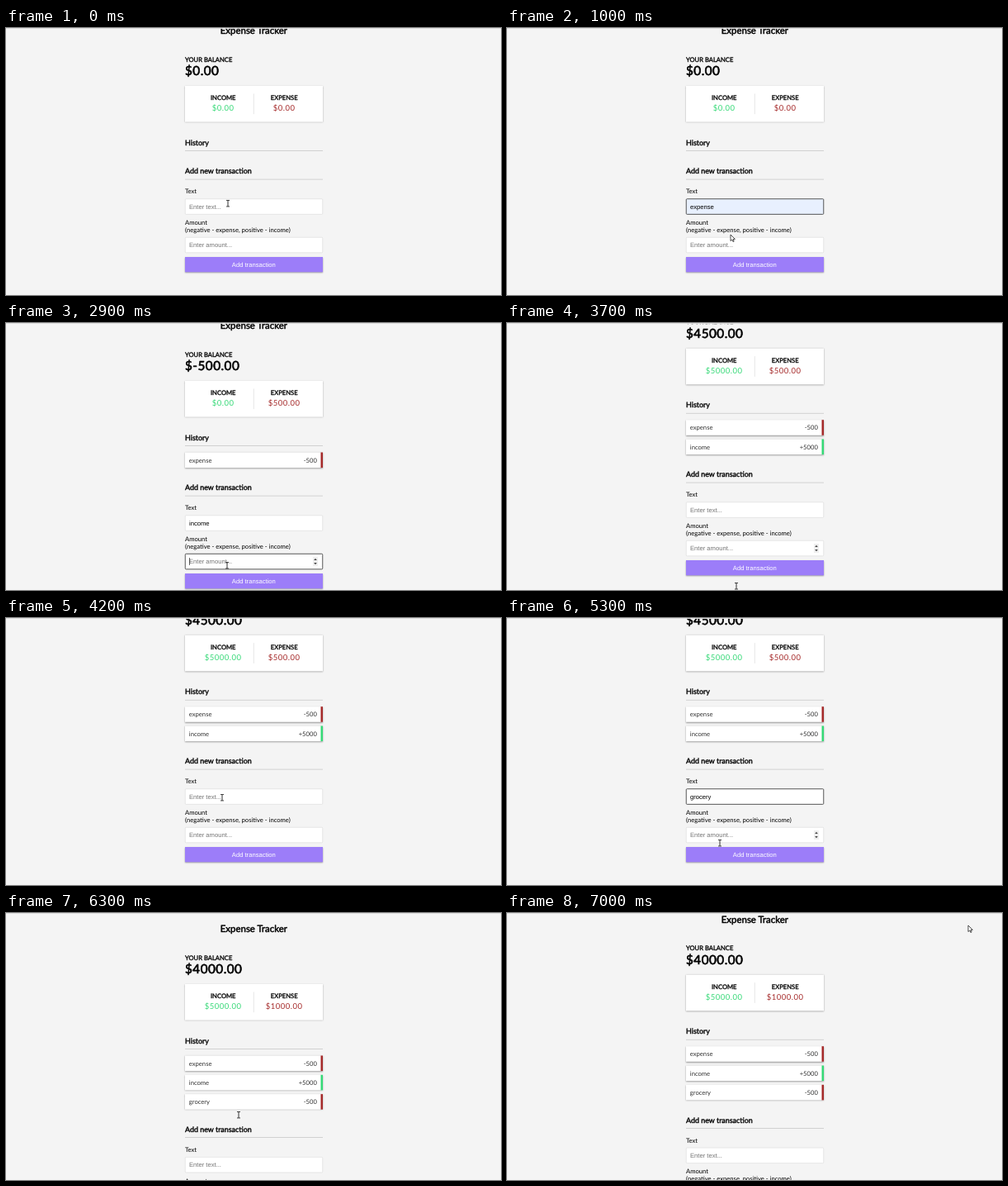
An HTML page with a canvas that plays this animation: 600 by 323 pixels, repeating every 7.1 s.

```html
<!DOCTYPE html>
<html lang="en">
<head>
<meta charset="utf-8">
<title>Expense Tracker</title>
<style>
html, body { margin: 0; width: 100%; height: 100%; overflow: hidden; background: #f4f4f4; }
canvas { display: block; }
</style>
</head>
<body>
<canvas id="stage" width="600" height="323"></canvas>
<script>
const ctx = document.getElementById('stage').getContext('2d');
const LOOP = 7100, STEP = 100;
const LEFT = 217, RIGHT = 384, WIDTH = RIGHT - LEFT, BASE = 7.63;
const LATO = 'Lato, sans-serif', ARIAL = '"Liberation Sans", Arial, sans-serif';
const GREEN = '#36d977', RED = '#a52a2a', PURPLE = '#9c7df9';

// Times: field focus, first key, submit; autofill completes the name at once.
const entries = [
  { name: 'expense', amount: -500, nameFocus: 500, nameKey: 600, fill: 900, amountFocus: 1200, amountKey: 1300, submit: 1900 },
  { name: 'income', amount: 5000, nameFocus: 2200, nameKey: 2200, amountFocus: 2800, amountKey: 3000, submit: 3600 },
  { name: 'grocery', amount: -500, nameFocus: 4300, nameKey: 4400, amountFocus: 5400, amountKey: 5500, submit: 6000 }
];
const scrollKeys = [[0, 0], [3600, 0], [3700, -39.3], [3800, -49.3], [6000, -49.3], [6300, 16], [6400, 16], [6600, 4.7]];
const pointerKeys = [
  [0, 269, 212, 'beam'], [400, 269, 212, 'beam'], [500, 268, 216, 'beam'], [700, 268, 218, 'beam'],
  [900, 272, 240, 'arrow'], [1000, 271, 250, 'arrow'], [1100, 270, 258, 'beam'], [1400, 270, 263, 'beam'],
  [1700, 270, 284, 'hand'], [1800, 270, 286, 'hand'], [1900, 270, 286, 'hand'], [2000, 270, 284, 'beam'],
  [2200, 268, 242, 'beam'], [2600, 268, 250, 'beam'], [2800, 268, 290, 'beam'], [2900, 268, 293, 'beam'],
  [3200, 268, 294, 'beam'], [3400, 272, 312, 'hand'], [3600, 274, 314, 'hand'], [3700, 278, 318, 'beam'],
  [3900, 276, 300, 'beam'], [4200, 262, 217, 'beam'], [5000, 262, 220, 'beam'], [5300, 258, 272, 'beam'],
  [5400, 258, 264, 'beam'], [5600, 260, 266, 'beam'], [5800, 268, 286, 'hand'], [6000, 270, 284, 'hand'],
  [6100, 274, 270, 'beam'], [6300, 282, 244, 'beam'], [6400, 282, 230, 'arrow'], [6700, 286, 217, 'arrow'],
  [6800, 380, 140, 'arrow'], [6900, 520, 40, 'arrow'], [7000, 559, 15, 'arrow']
];

function tween(keys, t) {
  let i = keys.length - 1;
  while (i > 0 && keys[i][0] > t) i--;
  const a = keys[i], b = keys[i + 1] || a;
  const p = b === a ? 0 : (t - a[0]) / (b[0] - a[0]);
  return a.slice(1).map((v, j) => typeof v === 'number' ? v + (b[j + 1] - v) * p : v);
}

function text(str, x, y, { size = BASE, font = LATO, color = '#000', align = 'left', bold = false, spacing = 0 } = {}) {
  ctx.font = `${size}px ${font}`;
  ctx.textRendering = 'geometricPrecision';
  ctx.letterSpacing = spacing + 'px';
  ctx.textAlign = align;
  ctx.fillStyle = ctx.strokeStyle = color;
  ctx.fillText(str, x, y);
  if (bold) {
    ctx.lineWidth = size / 24;
    ctx.lineJoin = 'round';
    ctx.strokeText(str, x, y);
  }
}

function rect(x, y, w, h, color) {
  ctx.fillStyle = color;
  ctx.fillRect(x, y, w, h);
}

function panel(y, h, color = '#fff') {
  ctx.save();
  ctx.shadowColor = 'rgba(0,0,0,.38)';
  ctx.shadowBlur = 1.8;
  ctx.shadowOffsetY = 0.7;
  rect(LEFT, y, WIDTH, h, color);
  ctx.restore();
}

function heading(str, y) {
  text(str, LEFT, y, { size: 8.93, bold: true });
  rect(LEFT, y + 6.5, WIDTH, 0.6, '#bbb');
}

function total(label, value, x, color) {
  text(label, x, 86.9, { align: 'center', bold: true });
  text('$' + value.toFixed(2), x, 100.4, { size: 9.54, color, align: 'center', spacing: 0.48 });
}

function input(y, value, hint, { focused, filled, spinner, caret }) {
  ctx.beginPath();
  ctx.roundRect(LEFT + 0.25, y + 0.25, WIDTH - 0.5, 18.6, 1);
  ctx.fillStyle = filled ? '#e8f0fe' : '#fff';
  ctx.fill();
  ctx.lineWidth = focused ? 0.9 : 0.5;
  ctx.strokeStyle = focused ? '#444' : '#d0d0d0';
  ctx.stroke();
  text(value || hint, 222, y + 12.2, { font: ARIAL, color: value ? '#000' : '#757575' });
  if (focused && caret) rect(222.2 + (value ? ctx.measureText(value).width : 0), y + 5, 0.6, 9, '#000');
  if (spinner) {
    rect(372, y + 4, 6, 11, '#efefef');
    for (const dir of [-1, 1]) {
      const cy = y + 9.5 + dir * 1.5;
      ctx.beginPath();
      ctx.moveTo(373.2, cy);
      ctx.lineTo(376.8, cy);
      ctx.lineTo(375, cy + dir * 2.2);
      ctx.fillStyle = '#444';
      ctx.fill();
    }
  }
}

function listItem(entry, y, hovered) {
  const color = entry.amount < 0 ? RED : GREEN;
  panel(y, 18.6);
  rect(RIGHT - 2.5, y, 2.5, 18.6, color);
  text(entry.name, 221.8, y + 12, { color: '#333' });
  text((entry.amount < 0 ? '' : '+') + entry.amount, 376.8, y + 12, { color: '#333', align: 'right' });
  if (hovered) {
    rect(207, y + 2.6, 10, 13.4, '#e74c3c');
    text('x', 212, y + 12, { size: 9.5, color: '#fff', align: 'center' });
  }
}

function form(top, t) {
  const entry = entries.find(e => t < e.submit);
  const typed = (str, start) => str.slice(0, Math.max(0, (t - start) / STEP + 1));
  let name = '', amount = '', focus = '';
  if (entry) {
    name = t >= entry.fill ? entry.name : typed(entry.name, entry.nameKey);
    amount = typed(String(entry.amount), entry.amountKey);
    focus = t >= entry.amountFocus ? 'amount' : t >= entry.nameFocus ? 'name' : '';
  }
  const caret = t % 1000 >= 500;
  const spinner = [[1200, 2100], [2800, 4200], [5300, 6000]].some(([a, b]) => t >= a && t < b);

  ctx.save();
  ctx.translate(0, top);
  heading('Add new transaction', 176.3);
  text('Text', LEFT, 200.3);
  input(206.5, name, 'Enter text...', { focused: focus === 'name', filled: entry && t >= entry.fill, caret });
  text('Amount', LEFT, 238);
  text('(negative - expense, positive - income)', LEFT, 247);
  input(253, amount, 'Enter amount...', { focused: focus === 'amount', spinner, caret });
  panel(277, 18.3, PURPLE);
  text('Add transaction', 300.3, 288.8, { font: ARIAL, color: '#fff', align: 'center' });
  ctx.restore();
}

function outline(points, x, y) {
  ctx.beginPath();
  points.forEach(([px, py]) => ctx.lineTo(x + px, y + py));
  ctx.closePath();
  ctx.lineJoin = 'round';
  ctx.lineWidth = 0.8;
  ctx.fillStyle = '#fff';
  ctx.strokeStyle = '#222';
  ctx.fill();
  ctx.stroke();
}

const pointers = {
  beam(x, y) {
    rect(x - 0.5, y - 3.5, 1, 7.5, '#333');
    rect(x - 2, y - 4, 4, 0.9, '#333');
    rect(x - 2, y + 3.5, 4, 0.9, '#333');
  },
  arrow(x, y) {
    outline([[0, 0], [0, 7.6], [1.8, 6], [3, 8.6], [4.2, 8], [3.1, 5.5], [5.4, 5.4]], x, y);
  },
  hand(x, y) {
    outline([[-1.2, -4.5], [0.2, -4.5], [0.4, -1], [3.6, 0], [4, 1.5], [3, 5], [-1.5, 5],
      [-4, 1.2], [-3.2, 0.4], [-1.4, 1.8]], x, y);
  }
};

function draw(t) {
  const [scroll] = tween(scrollKeys, t);
  const [x, y, pointer] = tween(pointerKeys, t);
  const history = entries.filter(e => t >= e.submit);
  const sum = sign => history.reduce((s, e) => s + Math.max(0, e.amount * sign), 0);
  const income = sum(1), expense = sum(-1);

  rect(0, 0, 600, 323, '#f4f4f4');
  ctx.save();
  ctx.translate(0, scroll);
  text('Expense Tracker', 300.3, 7.2, { size: 11.45, align: 'center', bold: true });
  text('YOUR BALANCE', LEFT, 40.7, { bold: true });
  text('$' + (income - expense).toFixed(2), LEFT, 57.4, { size: 15.27, bold: true, spacing: 0.48 });
  panel(70, 43.7);
  rect(299.9, 79.5, 0.5, 24.7, '#ccc');
  total('INCOME', income, 263.2, GREEN);
  total('EXPENSE', expense, 337.2, RED);
  heading('History', 141.7);
  history.forEach((entry, i) => {
    const top = 156.5 + i * 23.3, rel = y - scroll - top;
    listItem(entry, top, x > LEFT && x < RIGHT && rel > 0 && rel < 18.6);
  });
  form(history.length ? 2.7 + history.length * 23.3 : 0, t);
  ctx.restore();

  rect(0, 0, 600, 1, '#dcdcdc');
  pointers[pointer](x, y);
}

function frame(now) {
  draw(Math.floor(now % LOOP / STEP) * STEP);
  requestAnimationFrame(frame);
}
requestAnimationFrame(frame);
</script>
</body>
</html>
```
